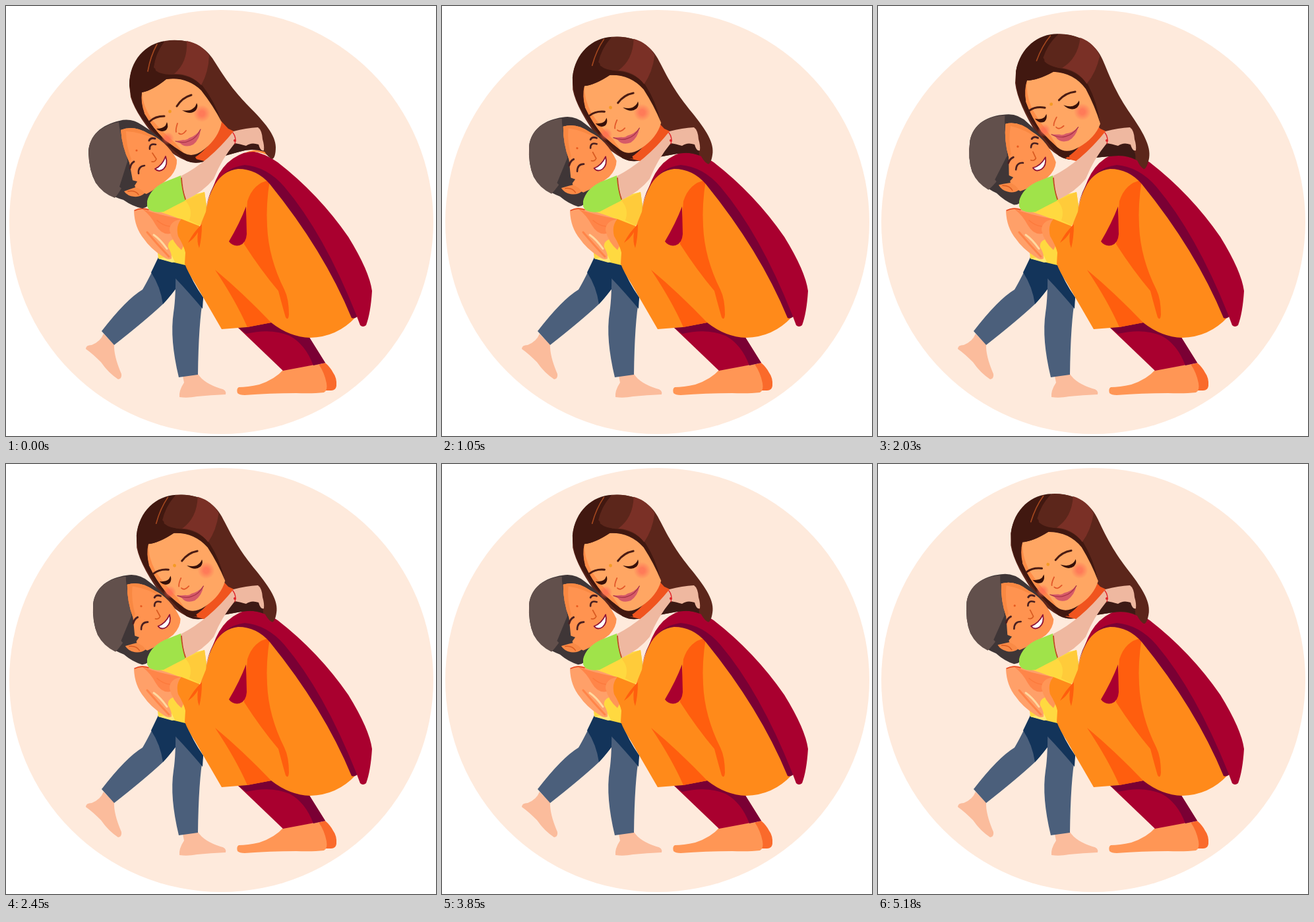
An HTML page with a canvas for the animation above (5.25 s loop, 652 px wide and 652 px high).

```html
<!DOCTYPE html>
<html lang="en">
<head>
<meta charset="utf-8">
<title>Hug</title>
<style>
html, body { margin: 0; width: 100%; height: 100%; overflow: hidden; background: #fff; }
canvas { display: block; width: 100vw; height: 100vh; }
</style>
</head>
<body>
<canvas id="stage"></canvas>
<script>
const SIZE = 652, LOOP = 5250, STEP = 70, SWAY = 1400;
const canvas = document.getElementById('stage');
const ctx = canvas.getContext('2d');
const dpr = window.devicePixelRatio || 1;
canvas.width = canvas.height = SIZE * dpr;
ctx.lineCap = ctx.lineJoin = 'round';

const SKIN = '#ffa663', PALE = '#fbbc9c', WINE = '#a9002f', PLUM = '#7a0034';
const SAFFRON = '#ff8a1a', EMBER = '#ff5e0e', DENIM = '#4b5f7b', NAVY = '#13345a';
const BROWN = '#5c261b', DARK = '#411810', CHAR = '#3f3637';

const cache = {};
const path = d => cache[d] || (cache[d] = new Path2D(d));

function fill(color, d) {
  ctx.fillStyle = color;
  ctx.fill(path(d));
}

function line(color, width, d) {
  ctx.strokeStyle = color;
  ctx.lineWidth = width;
  ctx.stroke(path(d));
}

function dot(color, x, y, r) {
  ctx.fillStyle = color;
  ctx.beginPath();
  ctx.arc(x, y, r, 0, Math.PI * 2);
  ctx.fill();
}

function blush(x, y, r) {
  const g = ctx.createRadialGradient(x, y, r * 0.3, x, y, r);
  g.addColorStop(0, 'rgba(255,104,84,0.7)');
  g.addColorStop(1, 'rgba(255,104,84,0)');
  dot(g, x, y, r);
}

function turned(x, y, angle, draw) {
  ctx.save();
  ctx.translate(x, y);
  ctx.rotate(angle);
  ctx.translate(-x, -y);
  draw();
  ctx.restore();
}

function childBody() {
  // feet
  fill(PALE, 'M148 497L164 513Q163 530 175 558Q176 565 170 566Q155 556 144 540Q131 527 121 520Q121 514 130 514Q143 509 148 497Z');
  fill(PALE, 'M268 561L291 558Q300 572 325 580Q335 582 333 589Q310 590 290 592Q275 595 263 593Q262 583 270 571Z');
  // trousers
  fill(DENIM, 'M231 383Q216 415 207 430Q182 445 145 493L164 514Q210 478 238 452L258 428V388Z');
  fill(NAVY, 'M231 381L272 391L258 428Q246 444 238 452Q234 425 220 404Z');
  fill(DENIM, 'M257 389L272 391Q280 415 299 442Q292 480 291 559L262 563Q248 505 254 465Q258 440 257 389Z');
  fill(NAVY, 'M257 389L272 391Q283 420 299 442L298 459Q277 434 257 413Z');
  // shirt
  fill('#ffd940', 'M222 306L268 290L301 282Q303 295 305 310L292 336L272 370L272 393L231 383Z');
  fill('#ffcb3a', 'M272 295L301 282Q303 295 305 312L294 333L278 325Q284 308 272 295Z');
  fill('#ffe873', 'M231 383Q240 382 251 378L256 388L252 389Z');
}

function embrace() {
  fill('#ffa069', 'M194 311Q203 303 218 308Q245 315 266 324L258 352Q244 356 246 366Q252 376 251 383Q246 386 238 380Q219 368 209 353Q195 336 194 311Z');
  fill('#ff8549', 'M207 308Q232 317 266 323L250 345Q236 348 227 332Q219 317 207 308Z');
  line('#ff8549', 3, 'M214 343Q230 362 247 380');
  line('#ffd9a0', 3, 'M224 347Q234 354 244 368');
  fill('#ff9657', 'M266 323Q248 326 248 340Q252 358 266 370L276 350Z');
  line('#fc7a3d', 1.5, 'M229 325Q238 333 248 334');
  line('#e64520', 1.4, 'M195 310Q205 305 216 309');
}

function motherBody() {
  // feet
  fill('#fa6a2b', 'M484 541Q492 548 496 556Q502 564 501 576Q500 583 493 583H482L464 546Z');
  fill('#ff9655', 'M421 551Q408 566 384 574Q366 578 353 578Q349 580 351 587Q354 590 362 590Q400 587 440 587Q465 588 482 586Q488 583 486 572Q483 556 474 543Z');
  // trousers
  fill(WINE, 'M350 486L405 476L459 501L484 541L420 553Z');
  fill(PLUM, 'M351 487L402 478L459 501L484 541L466 545Q454 513 430 500Q402 488 364 497Z');
  embrace();
  // tunic
  fill(SAFFRON, 'M352 244Q327 248 316 270Q305 294 303 312L294 334L266 323Q257 333 261 349Q270 364 272 374L271 391Q276 404 287 421L327 490L365 487L402 480Q430 502 461 503Q502 502 530 472L480 350L400 255Z');
  fill(EMBER, 'M400 264Q375 268 366 296Q363 335 361 361Q386 400 413 432Q419 455 424 472Q428 478 429 468Q429 444 422 430Q398 382 396 334Q394 300 400 264Z');
  fill(EMBER, 'M317 400Q358 434 402 480L366 487Q349 448 317 400Z');
  fill(EMBER, 'M297 331Q284 343 276 359Q286 352 291 343Q289 358 293 367Q297 351 297 331Z');
  fill(WINE, 'M364 304Q354 330 338 357Q344 365 354 363Q364 360 365 346Z');
  // shawl
  fill(PLUM, 'M303 310Q305 291 315 272Q330 238 366 238Q392 242 416 262Q490 328 534 470Q528 475 524 473Q482 371 400 270Q380 247 352 247Q329 250 317 270Q305 292 303 310Z');
  fill(WINE, 'M314 275Q329 228 372 220Q392 223 412 237Q474 285 519 350Q551 402 555 432Q553 465 546 484Q541 488 537 484L531 468Q482 345 422 274Q396 244 362 241Q330 245 314 275Z');
  fill('#ff8b3c', 'M362 223Q376 215 394 221L396 226Q378 218 362 223Z');
}

function motherHair() {
  fill(BROWN, 'M187 120C188 76 222 50 262 52C290 54 306 66 318 87C338 119 350 133 368 152C392 176 409 196 409 214C409 224 407 231 404 232Q398 230 392 221Q373 215 354 221L300 236Q286 240 274 235Q256 228 238 212Q198 168 189 138Z');
  fill('#3d1a15', 'M335 190L365 195Q388 202 389 220Q373 215 354 221L300 236Q286 240 274 235Q255 222 243 205Z');
}

function motherFace() {
  fill(DARK, 'M188 112Q186 140 203 165Q224 195 250 215L274 235L290 234L225 130Z');
  fill(SKIN, 'M206 131Q222 128 243 111Q275 106 297 127Q318 152 327 176Q323 199 301 217Q284 231 270 223Q255 213 241 203Q222 184 210 163Q203 145 206 131Z');
  fill('#ff8d48', 'M206 131Q207 150 221 172Q238 192 257 208L270 223Q255 214 241 203Q222 184 210 163Q203 145 206 131Z');
  blush(297, 163, 13);
  blush(245, 201, 10);
  // brows and closed eyes
  line('#4b1c13', 3, 'M259 152Q267 139 281 135');
  line('#4b1c13', 3, 'M218 175Q226 167 240 167');
  fill('#361009', 'M267 158Q279 160 284 155Q288 152 289 147Q292 152 288 158Q280 166 267 158Z');
  fill('#361009', 'M228 186Q238 186 242 181L244 176Q247 183 243 188Q236 193 228 186Z');
  line('#e2582a', 1.8, 'M260 178Q257 187 258 191M262 193Q267 197 273 189');
  // mouth
  fill('#d65a68', 'M257 205Q264 204 269 203Q274 204 278 200Q288 197 295 187Q294 202 284 210Q272 216 264 208Z');
  line('#a83348', 1.2, 'M257 205Q270 209 279 204Q289 200 295 187');
  dot('#f59a23', 248.5, 160, 2.4);
}

function motherFringe() {
  fill(DARK, 'M187 120C187 82 212 57 241 53Q226 74 224 93Q232 103 250 104Q278 102 298 121Q316 144 327 176Q314 151 296 128Q274 107 243 111Q222 128 206 131Q204 146 210 163Q194 148 189 132Z');
  fill(BROWN, 'M241 53Q258 50 276 54Q274 82 260 103Q238 106 227 98Q222 78 241 53Z');
  fill('#7a3026', 'M274 53Q296 57 308 75Q307 101 296 120Q279 102 255 103Q276 85 274 53Z');
  line('#a5481f', 1.6, 'M229 58Q219 76 215 99');
}

function childHead() {
  fill(CHAR, 'M125 222C126 196 145 180 172 174Q190 169 207 181Q228 194 240 208L224 290Q218 305 207 307Q192 304 178 294Q150 286 136 268Q126 250 125 222Z');
  fill('#62504c', 'M125 222C126 196 145 181 171 176Q172 190 179 210Q188 238 182 262Q175 279 165 291Q146 284 136 268Q126 250 125 222Z');
  fill('#ff9350', 'M174 188Q193 180 215 193Q242 203 259 233Q260 246 250 258Q232 275 213 285L198 280L192 264L187 237Q176 214 174 188Z');
  fill('#f98842', 'M174 188Q193 180 215 193L233 205Q206 191 182 190Q182 212 190 232L187 237Q176 214 174 188Z');
  fill(CHAR, 'M184 236Q190 248 187 263L199 266Q194 277 180 281L172 274Z');
  // ear
  fill('#f98a46', 'M179 281Q187 278 196 275Q207 278 210 284Q204 290 194 289Q184 288 179 281Z');
  line('#d95b22', 1.5, 'M185 281Q196 279 201 286');
  // brows and smiling eyes
  line('#4a2020', 3, 'M188 246Q189 239 194 236M217 204Q219 199 226 201');
  line('#4a2020', 2.6, 'M201 254Q200 243 210 242M218 217Q217 208 227 210');
  line('#d85a20', 1.7, 'M222 223L228 232Q226 237 221 236');
  const smile = 'M226 247Q237 242 242 228Q246 240 239 247Q232 253 226 247Z';
  fill('#fff', smile);
  line('#8e1436', 1.8, smile);
  dot('#e85a20', 198, 219, 1.6);
}

function childArm() {
  fill('#efb8a0', 'M265 258Q308 236 345 190Q364 185 382 184Q388 188 389 202Q392 212 391 219Q386 221 383 210Q372 206 364 212Q354 209 347 208Q327 232 315 262Q300 281 273 294Z');
  line('#e0252b', 1.3, 'M344 192Q350 200 347 209');
  dot('#e0252b', 347, 204, 2);
  fill('#a0e34a', 'M214 296Q218 278 240 267L265 257Q267 275 272 295Q256 303 239 312Q218 315 214 304Z');
  line('#c04a22', 1.8, 'M266 261Q267 277 272 293');
}

function draw(ms) {
  const t = Math.floor((ms % LOOP) / STEP) * STEP;
  const sway = (1 - Math.cos(t / SWAY * Math.PI * 2)) / 2;
  const tilt = part => turned(318, 234, sway * 0.182, part);

  ctx.setTransform(dpr, 0, 0, dpr, 0, 0);
  ctx.fillStyle = '#fff';
  ctx.fillRect(0, 0, SIZE, SIZE);
  dot('#feeadc', 326.5, 327.5, 321.5);

  childBody();
  motherBody();
  tilt(motherHair);
  fill('#f0541e', 'M324 172L337 186L350 192L304 236L284 231Q316 212 324 172Z');
  tilt(() => { motherFace(); motherFringe(); });
  turned(240, 300, sway * 0.17, childHead);
  childArm();
}

let start;
function tick(now) {
  if (start === undefined) start = now;
  draw(now - start);
  requestAnimationFrame(tick);
}
draw(0);
requestAnimationFrame(tick);
</script>
</body>
</html>
```
